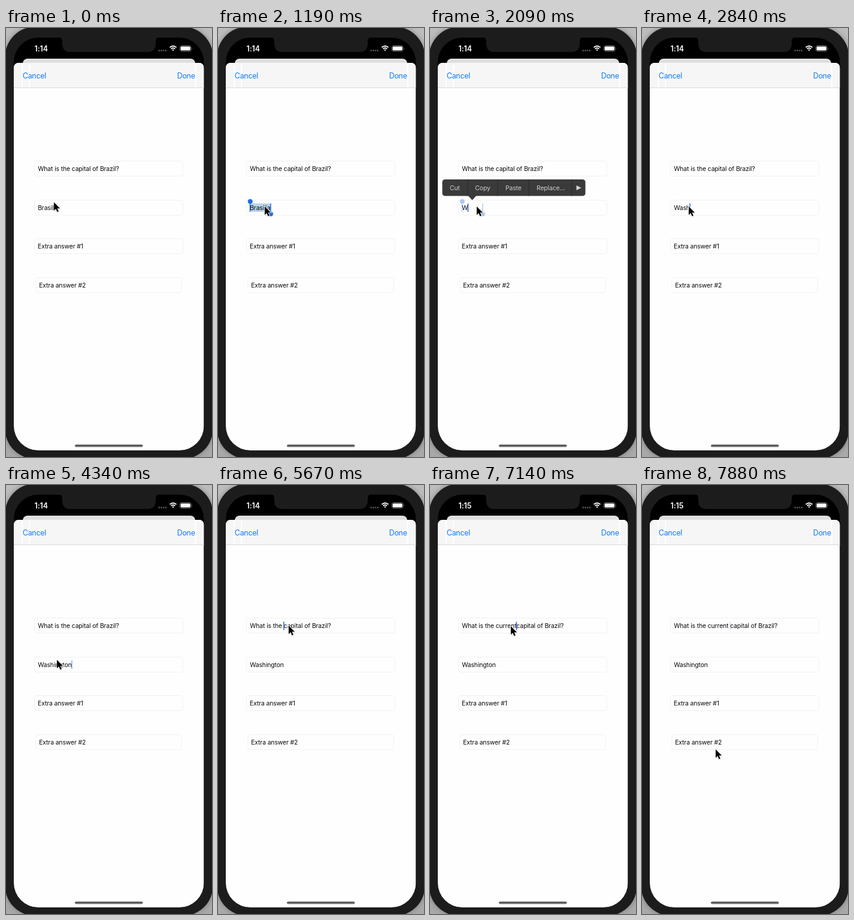
An HTML page for the animation above (8000 ms loop, 344 by 714 pixels).

```html
<!DOCTYPE html>
<html lang="en">
<head>
<meta charset="utf-8">
<title>Question editor</title>
<style>
  html, body { margin: 0; width: 100%; height: 100%; overflow: hidden; background: #aaa; }
  svg { display: block; width: 344px; height: 714px; }
  text { font: 10.4px Inter, "Open Sans", sans-serif; letter-spacing: -.12px; white-space: pre; fill: #0a0a0a; }
  .nav { font-size: 12.5px; letter-spacing: -.3px; fill: #127bfb; }
  .clock { font-size: 12.5px; font-weight: 600; letter-spacing: -.1px; fill: #fff; }
  .field { fill: #fefefe; stroke: #f1f1f1; }
  .menu text { fill: #cfcfcf; }
  .wifi { fill: none; stroke: #fff; stroke-width: 1.8; }
</style>
</head>
<body>
<svg viewBox="0 0 344 714">
  <defs>
    <linearGradient id="backdrop" x2="0" y2="1">
      <stop stop-color="#bdbdbd"/><stop offset="1" stop-color="#a9a9a9"/>
    </linearGradient>
    <linearGradient id="homeBar" x2="0" y2="1">
      <stop stop-color="#343434"/><stop offset="1" stop-color="#8c8c8c"/>
    </linearGradient>
    <filter id="blur"><feGaussianBlur stdDeviation="4"/></filter>
    <filter id="soft" x="-50%" y="-50%" width="200%" height="200%"><feGaussianBlur stdDeviation=".8"/></filter>
    <clipPath id="screen"><rect x="13" y="16" width="317.5" height="687" rx="41"/></clipPath>
  </defs>

  <!-- Phone -->
  <rect width="344" height="714" fill="url(#backdrop)"/>
  <rect x="-1.5" y="-2" width="347" height="719" rx="50" fill="#555" opacity=".6" filter="url(#blur)"/>
  <rect x="-1.5" y="-2" width="347" height="719" rx="50" fill="#1c1c1c"/>
  <g clip-path="url(#screen)">
    <rect x="13" y="16" width="318" height="687"/>
    <rect x="28" y="51" width="288" height="30" rx="8" fill="#dfdfdf"/>
    <rect x="13" y="58" width="317.5" height="660" rx="8.5" fill="#fefefe"/>
    <path d="M13 100V66.500Q13 58 21.500 58H322Q330.500 58 330.500 66.500V100Z" fill="#f6f6f6"/>
    <path d="M13 99.500H331" stroke="#d9d9d9"/>
    <path d="M27 60V99M39 60V99M316.500 60V99" stroke="#fff" stroke-width="2"/>
  </g>
  <path d="M88 15Q94 16 94 22V26Q94 40 108 40H236Q250 40 250 26V22Q250 16 256 15Z" fill="#1c1c1c"/>

  <!-- Status bar -->
  <text id="clock" class="clock" x="47.500" y="38.500"></text>
  <path d="M254.500 37.500H268" stroke="#555" stroke-width="2.400" stroke-dasharray="2.400 1.300"/>
  <g class="wifi">
    <path d="M273.500 32.300Q279 27.600 284.500 32.300M275.600 34.700Q279 31.900 282.400 34.700"/>
    <path d="M277.300 36.200Q279 35 280.700 36.200L279 38.200Z" fill="#fff" stroke="none"/>
  </g>
  <rect x="290.500" y="29.500" width="18.500" height="9" rx="2.500" fill="none" stroke="#777"/>
  <rect x="291.700" y="30.700" width="16" height="6.600" rx="1.500" fill="#fff"/>
  <path d="M310.500 32.300Q312 34 310.500 35.700Z" fill="#888"/>

  <text class="nav" x="27.800" y="83.800">Cancel</text>
  <text class="nav" x="285.700" y="83.800">Done</text>
  <rect x="115" y="693.500" width="113.500" height="4" rx="2" fill="url(#homeBar)"/>

  <!-- Form -->
  <rect class="field" x="47.500" y="221.500" width="248" height="25" rx="4"/>
  <rect class="field" x="47.500" y="286.500" width="248" height="25" rx="4"/>
  <rect class="field" x="47.500" y="350.500" width="248" height="25" rx="4"/>
  <rect class="field" x="50" y="415.500" width="243.500" height="25" rx="4"/>
  <rect id="highlight" x="53" y="292" width="35" height="14" fill="#b9d3ea"/>
  <text id="question" x="53.200" y="238"></text>
  <text id="answer" x="53.200" y="302.800"></text>
  <text x="53" y="367.300">Extra answer #1</text>
  <text x="55.200" y="432">Extra answer #2</text>
  <g id="handles" fill="#1f6ce0" stroke="#1f6ce0">
    <path d="M53.500 289V306M88 292V309" stroke-width="1.400"/>
    <circle cx="53.800" cy="288.700" r="3.600"/><circle cx="88" cy="309.500" r="3.600"/>
  </g>
  <rect id="caret" width="1.500" height="14" fill="#3262dc"/>

  <g id="menu" class="menu">
    <path d="M25.500 252H254.500Q259.500 252 259.500 257V274.500Q259.500 279.500 254.500 279.500H77L70.500 286.500L64 279.500H25.500Q20.500 279.500 20.500 274.500V257Q20.500 252 25.500 252Z" fill="#3a3a3a"/>
    <path d="M63 252V279.500M113 252V279.500M165 252V279.500M236.500 252V279.500" stroke="#2b2b2b"/>
    <text x="33" y="269.700">Cut</text>
    <text x="75.300" y="269.700">Copy</text>
    <text x="126" y="269.700">Paste</text>
    <text x="178" y="269.700">Replace…</text>
    <path d="M244.500 262L252.500 266L244.500 270Z" fill="#d8d8d8"/>
  </g>

  <g id="pointer">
    <path d="M0 1V15L3.300 12L5.700 17L8 16L5.700 11.200H10.500Z" fill="#000" opacity=".35" filter="url(#soft)"/>
    <path d="M0 0V14L3.300 11L5.600 16.200L7.900 15.200L5.600 10.200H10.200Z" stroke="#fff" stroke-width="1.600" paint-order="stroke"/>
  </g>
</svg>
<script>
const LOOP = 8000;
const $ = id => document.getElementById(id);

// Each step overrides only the values that change at its time (ms).
const steps = [
  [0, { clock: '1:14', inserted: '', answer: 'Brasilia', pointer: [80, 290],
        highlight: 0, handles: 0, menu: 0, focus: 'answer', caret: 0 }],
  [890, { pointer: [79, 294] }],
  [1040, { pointer: [78, 297], highlight: .5, handles: .4 }],
  [1190, { highlight: 1, handles: 1 }],
  [1340, { menu: .5 }],
  [1490, { menu: 1 }],
  [2090, { answer: 'W', highlight: 0, handles: .35, caret: 1 }],
  [2240, { answer: 'Wa', handles: 0, menu: .4 }],
  [2390, { menu: 0 }],
  ...typing('answer', 'Wash', 3, [2690, 2840]),
  ...typing('answer', 'Washington', 5, [3140, 3290, 3440, 3590, 3740, 3890]),
  [4340, { pointer: [85, 291], caret: .55 }],
  [4490, { pointer: [108, 264] }],
  [4640, { pointer: [126, 240] }],
  [4790, { pointer: [116, 235] }],
  [4930, { pointer: [107, 234] }],
  [5380, { focus: 'question', caret: 1 }],
  [5670, { pointer: [118, 234] }],
  [5820, { pointer: [128, 234] }],
  [5970, { pointer: [135, 235] }],
  ...typing('inserted', 'cur', 1, [6110, 6250, 6550]),
  ...typing('inserted', 'current ', 5, [6840, 6990, 7140, 7290]),
  [6990, { clock: '1:15' }],
  [7580, { pointer: [141, 258] }],
  [7730, { pointer: [152, 345], caret: .6 }],
  [7880, { pointer: [123, 440], caret: .2 }],
];

function typing(key, text, firstLength, times) {
  return times.map((at, i) => [at, { [key]: text.slice(0, firstLength + i) }]);
}

function render(time) {
  const state = Object.assign({}, ...steps.filter(([at]) => at <= time).map(step => step[1]));
  const before = 'What is the ' + state.inserted;
  $('clock').textContent = state.clock;
  $('question').textContent = before + 'capital of Brazil?';
  $('answer').textContent = state.answer;
  for (const id of ['highlight', 'handles', 'menu', 'caret']) $(id).setAttribute('opacity', state[id]);

  const field = $(state.focus);
  const length = state.focus === 'question' ? before.length : state.answer.length;
  $('caret').setAttribute('x', 52.6 + field.getSubStringLength(0, length));
  $('caret').setAttribute('y', state.focus === 'question' ? 227.5 : 292);
  $('pointer').setAttribute('transform', `translate(${state.pointer})`);
}

const start = performance.now();
function tick() {
  render((performance.now() - start) % LOOP);
  requestAnimationFrame(tick);
}
tick();
</script>
</body>
</html>
```
